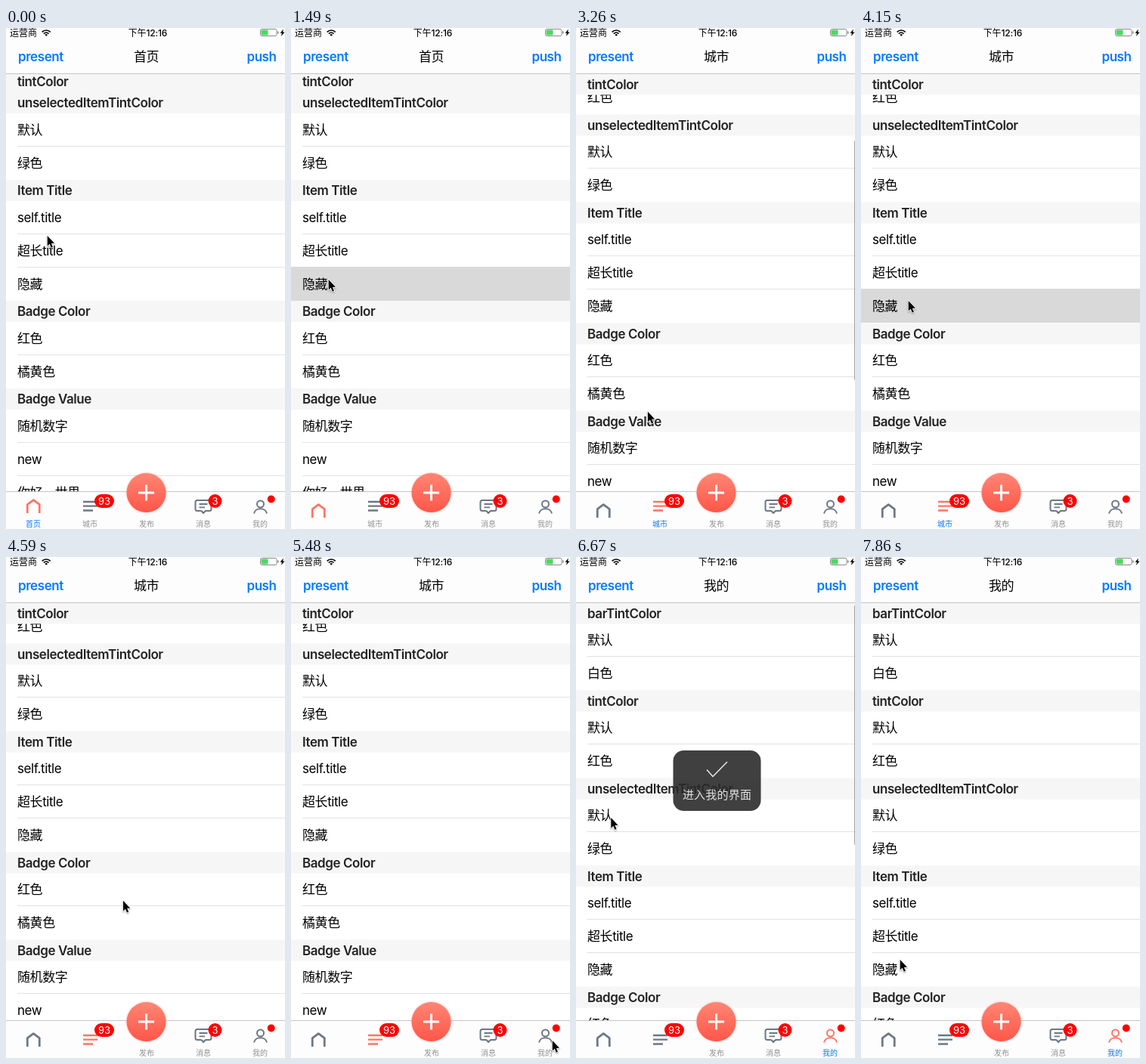
An HTML page with a canvas for the animation above (8 s loop, 369x663 px).

```html
<!DOCTYPE html>
<html lang="zh-CN">
<head>
<meta charset="utf-8">
<title>Tab bar demo</title>
<style>
html, body { margin: 0; width: 100%; height: 100%; overflow: hidden; background: #fff; }
canvas { display: block; width: 369px; height: 663px; }
</style>
</head>
<body>
<canvas id="stage"></canvas>
<script>
const W = 369, H = 663, LOOP = 8000, STEP = LOOP / 54;
const TOP = 60.5, TAB_Y = 613.5, ROW = 44, HEAD = 28;
const BLUE = '#007aff', CORAL = '#ff7464', SLATE = '#6c7783', RED = '#ff0000';
const FONT = 'Inter, "Noto Sans CJK SC", "Noto Sans CJK", sans-serif';

const SECTIONS = [
  ['barTintColor', '默认', '白色'],
  ['tintColor', '默认', '红色'],
  ['unselectedItemTintColor', '默认', '绿色'],
  ['Item Title', 'self.title', '超长title', '隐藏'],
  ['Badge Color', '红色', '橘黄色'],
  ['Badge Value', '随机数字', 'new', '你好，世界']
];

// One entry per visited tab: when it opens, list offset, scroll bar top
const PAGES = [
  { at: -9999, tab: 0, title: '首页', scroll: 207.5, bar: 168 },
  { at: 2815, tab: 1, title: '城市', scroll: 178, bar: 149 },
  { at: 5615, tab: 4, title: '我的', scroll: 0, bar: 64 }
];

// Row presses: highlight start, release, time the tab title goes away
const PRESSES = [
  { down: 1480, up: 1560, hide: 1480, tab: 0 },
  { down: 4070, up: 4200, hide: 4240, tab: 1 }
];

// Pointer path: time, x, y
const PATH = [
  [0, 54, 274], [330, 54, 274], [890, 47, 340], [1050, 49, 332], [1960, 49, 332],
  [2380, 127, 632], [2510, 123, 638], [2850, 123, 638], [3700, 62, 360],
  [4300, 62, 360], [5060, 341, 644], [5490, 345, 639], [5640, 342, 634],
  [6080, 105, 372], [6520, 45, 350], [7270, 51, 291], [7850, 51, 532], [LOOP, 51, 532]
];

const canvas = document.getElementById('stage');
const c = canvas.getContext('2d');
const dpr = window.devicePixelRatio || 1;
canvas.width = W * dpr;
canvas.height = H * dpr;

const clamp = v => Math.max(0, Math.min(1, v));
const smooth = v => v * v * (3 - 2 * v);

function rect(x, y, w, h, color) {
  c.fillStyle = color;
  c.fillRect(x, y, w, h);
}

function round(x, y, w, h, r, color) {
  c.beginPath();
  c.roundRect(x, y, w, h, r);
  c.fillStyle = color;
  c.fill();
}

function disc(x, y, r, color) {
  c.beginPath();
  c.arc(x, y, r, 0, 7);
  c.fillStyle = color;
  c.fill();
}

function text(s, x, y, size, { weight = 400, color = '#000', align = 'left', spacing = 0 } = {}) {
  c.font = `${weight} ${size}px ${FONT}`;
  c.letterSpacing = spacing + 'px';
  c.textAlign = align;
  c.fillStyle = color;
  c.fillText(s, x, y);
}

const body = (s, x, y, opt) => text(s, x, y, 17, { spacing: -0.43, ...opt });

function stroke(color, width, draw) {
  c.beginPath();
  draw();
  c.strokeStyle = color;
  c.lineWidth = width;
  c.stroke();
}

function line(...pts) {
  for (let i = 0; i < pts.length; i += 2) c[i ? 'lineTo' : 'moveTo'](pts[i], pts[i + 1]);
}

function pressAlpha(t, tab) {
  const p = PRESSES.find(p => p.tab === tab);
  return p && t >= p.down ? 1 - clamp((t - p.up) / 220) : 0;
}

function drawList(t, page) {
  const press = pressAlpha(t, page.tab);
  const heads = [];
  let y = TOP - page.scroll;
  for (const [name, ...rows] of SECTIONS) {
    const end = y + HEAD + rows.length * ROW;
    heads.push([name, Math.min(Math.max(y, TOP), Math.max(y, end - HEAD)), end]);
    rows.forEach((label, i) => {
      const top = y + HEAD + i * ROW;
      if (label === '隐藏' && press > 0) {
        rect(0, Math.floor(top - 1), W, ROW + 1, `rgba(217,217,217,${press})`);
      }
      body(label, 15, Math.round(top + 27.9));
      if (i < rows.length - 1) rect(15, Math.floor(top + ROW - 1), W, 1, '#e2e2e4');
    });
    y = end;
  }
  for (const [name, top, end] of heads) {
    if (end < TOP) continue;
    rect(0, top, W, HEAD, '#f6f6f6');
    body(name, 15, Math.round(top + 20.2), { weight: 600, color: '#222' });
  }
}

function drawScrollBar(t, page) {
  const dt = t - page.at;
  c.globalAlpha = clamp(1 - (dt - 1100) / 200);
  round(368, page.bar, 2.5, 317, 1.25, 'rgba(0,0,0,.35)');
  c.globalAlpha = 1;
}

function drawStatus() {
  text('运营商', 5, 10.5, 12);
  text('下午12:16', 187.5, 10.5, 12, { weight: 500, align: 'center', spacing: -0.15 });
  const a = Math.PI / 4;
  for (const r of [4.6, 7.8]) {
    stroke('#000', 1.7, () => c.arc(53.2, 10.8, r, -3 * a, -a));
  }
  c.beginPath();
  c.moveTo(53.2, 10.8);
  c.arc(53.2, 10.8, 2.6, -3 * a, -a);
  c.fillStyle = '#000';
  c.fill();

  stroke('#8a8a8a', 1, () => c.roundRect(336.5, 1.5, 21.5, 9, 2));
  round(337.5, 2.5, 9, 7, 1, '#4cd964');
  round(359, 4.3, 1.5, 3.5, 0.7, '#8a8a8a');
  c.beginPath();
  line(367, 1.5, 362.5, 6.8, 365, 6.8, 363.8, 11, 368.6, 5.4, 366, 5.4);
  c.fillStyle = '#000';
  c.fill();
}

function drawNav(title) {
  rect(0, 0, W, TOP, '#fdfdfd');
  rect(0, 60, W, 0.8, '#b8b8b8');
  drawStatus();
  body('present', 16, 44, { weight: 600, color: BLUE });
  body(title, 185.5, 44, { weight: 500, align: 'center' });
  body('push', 357.5, 44, { weight: 600, color: BLUE, align: 'right' });
}

// Icons are drawn around a tab centre x at 0 and y 633
const ICONS = {
  0: col => stroke(col, 2.7, () => line(-7.7, 642, -7.7, 630.6, 0.3, 624.6, 8.3, 630.6, 8.3, 642)),
  1: col => stroke(col, 2.3, () => {
    line(-9, 627, 10, 627);
    line(-9, 632.7, 10, 632.7);
    line(-9, 638.5, 4, 638.5);
  }),
  3: col => {
    stroke(col, 2, () => {
      line(-2.5, 639, -7.5, 639);
      c.arcTo(-10.5, 639, -10.5, 636, 2.5);
      c.arcTo(-10.5, 625, -8, 625, 2.5);
      c.arcTo(10.5, 625, 10.5, 628, 2.5);
      c.arcTo(10.5, 639, 8, 639, 2.5);
      c.lineTo(3, 639);
      c.lineTo(0, 642);
      c.lineTo(-2.5, 639);
    });
    stroke(col, 1.8, () => {
      line(-5.5, 630, 5.5, 630);
      line(-5.5, 634.3, 2, 634.3);
    });
  },
  4: col => {
    stroke(col, 2, () => c.arc(0.5, 630, 4.5, 0, 7));
    stroke(col, 2, () => {
      c.moveTo(-8, 642.5);
      c.bezierCurveTo(-6.5, 634.2, 7.5, 634.2, 9, 642.5);
    });
  }
};

function drawPublish() {
  const g = c.createLinearGradient(0, 589, 0, 641);
  g.addColorStop(0, '#ff8674');
  g.addColorStop(1, '#ff5648');
  c.save();
  c.shadowColor = 'rgba(255,90,75,.45)';
  c.shadowBlur = 3 * dpr;
  disc(185.5, 615, 26, g);
  c.restore();
  stroke('#fff', 3, () => {
    line(175, 615, 196, 615);
    line(185.5, 604.5, 185.5, 625.5);
  });
}

function drawTabs(t, page) {
  rect(0, TAB_Y, W, H - TAB_Y, '#fdfdfd');
  rect(0, 613, W, 0.8, '#b8b8b8');
  ['首页', '城市', '发布', '消息', '我的'].forEach((label, i) => {
    const x = 36 + 75 * i, on = page.tab === i;
    const hidden = PRESSES.some(p => p.tab === i && t >= p.hide);
    if (ICONS[i]) {
      c.save();
      c.translate(x, hidden ? 6 : 0);
      ICONS[i](on ? CORAL : SLATE);
      c.restore();
    }
    if (!hidden) text(label, x, 659.5, 10, { align: 'center', color: on ? BLUE : '#929292' });
  });
  drawPublish();
  round(117, 617, 26, 18, 9, RED);
  text('93', 130, 630.6, 13, { align: 'center', color: '#fff' });
  disc(276.5, 626, 9, RED);
  text('3', 276.5, 630.6, 13, { align: 'center', color: '#fff' });
  disc(350.7, 623.5, 5, RED);
}

function drawHud(t) {
  const alpha = clamp((t - 5560) / 200) * clamp(1 - (t - 6640) / 260);
  if (!alpha) return;
  c.globalAlpha = alpha;
  round(128.5, 256, 116, 80, 14, '#2b2b2b');
  stroke('#fff', 1.4, () => line(173, 281.5, 181, 290.5, 200, 271));
  text('进入我的界面', 186.5, 319.7, 15, { align: 'center', color: '#f4f4f4', spacing: 0.2 });
  c.globalAlpha = 1;
}

function drawPointer(t) {
  const i = PATH.findIndex(p => p[0] > t);
  const [t0, x0, y0] = PATH[i - 1], [t1, x1, y1] = PATH[i];
  const k = smooth((t - t0) / (t1 - t0));
  c.save();
  c.translate(x0 + (x1 - x0) * k, y0 + (y1 - y0) * k);
  c.beginPath();
  line(0.7, 1, 0.7, 14.6, 3.7, 11.8, 5.8, 16.7, 8, 15.8, 5.9, 11, 10, 10.8);
  c.closePath();
  c.shadowColor = 'rgba(0,0,0,.35)';
  c.shadowBlur = 2 * dpr;
  c.shadowOffsetY = dpr;
  c.strokeStyle = '#fff';
  c.lineWidth = 1.8;
  c.stroke();
  c.shadowColor = 'transparent';
  c.fillStyle = '#000';
  c.fill();
  c.restore();
}

function draw(now) {
  const t = Math.floor((now % LOOP + 9) / STEP) % 54 * STEP;
  const page = PAGES.filter(p => t >= p.at).pop();
  c.setTransform(dpr, 0, 0, dpr, 0, 0);
  c.lineJoin = 'round';
  rect(0, 0, W, H, '#fff');
  drawList(t, page);
  drawScrollBar(t, page);
  drawNav(page.title);
  drawTabs(t, page);
  drawHud(t);
  drawPointer(t);
}

const start = performance.now();
function tick() {
  draw(performance.now() - start);
  requestAnimationFrame(tick);
}
tick();
</script>
</body>
</html>
```
